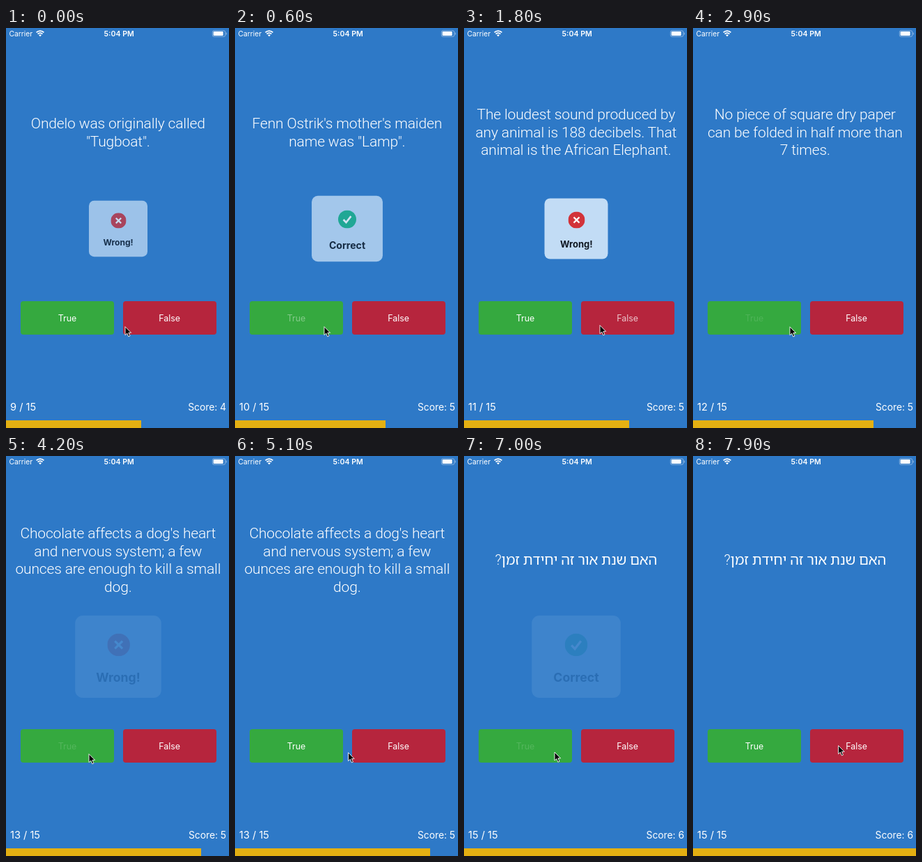
An HTML page for the animation above (8 s loop, 320 px wide and 574 px high).

```html
<!DOCTYPE html>
<html lang="en">
<head>
<meta charset="utf-8">
<title>Quiz</title>
<style>
  html, body { margin: 0; width: 100%; height: 100%; overflow: hidden; }
  body { position: relative; background: #2e79c7; color: #fff; font-family: Inter, sans-serif; }
  body > * { position: absolute; white-space: pre; }
  .mid { transform: translateY(-50%); }
  #carrier { left: 4.5px; top: 8px; font-size: 10.3px; }
  #clock { left: 140.6px; top: 8px; font-size: 10.6px; font-weight: 600; }
  #icons { left: 0; top: 0; }
  #question {
    left: .8px; width: 320px; top: 150.2px; text-align: center;
    font: 300 21px/25.5px Roboto, "Open Sans", "Noto Sans Hebrew", "Liberation Sans", sans-serif;
    letter-spacing: -.15px;
  }
  #question:dir(rtl) { font-size: 20.4px; }
  .button {
    top: 392.4px; width: 134.2px; height: 47.8px; border-radius: 4px;
    font-size: 12.4px; line-height: 49px; text-align: center;
  }
  #yes { left: 21px; background: #35a93f; }
  #no { left: 167.5px; background: #b6253d; }
  #count, #score { top: 543.8px; }
  #count { left: 6px; font-size: 14.6px; }
  #score { right: 4px; font-size: 13.8px; }
  #bar { left: 0; top: 563.2px; height: 11px; background: #e4b012; }
  #hud { left: 161.3px; top: 287.5px; height: 87px; border-radius: 8px; background: #c2dcf5; }
  #hud svg { position: absolute; left: 50%; top: 19px; margin-left: -12px; }
  #hud b {
    position: absolute; left: 0; width: 100%; top: 57px;
    font-size: 13px; line-height: 16px; text-align: center; color: #101823;
  }
  #cursor { left: 0; top: 0; overflow: visible; }
</style>
</head>
<body>
<div id="carrier" class="mid">Carrier</div>
<div id="clock" class="mid">5:04 PM</div>
<svg id="icons" width="320" height="16" fill="none" stroke="#fff">
  <path d="M43.6 6.4a7.6 7.6 0 0 1 10.8 0M45.6 8.6a4.8 4.8 0 0 1 6.8 0" stroke-width="1.7"/>
  <path d="M49 12.2l-1.9-2a2.7 2.7 0 0 1 3.8 0z" fill="#fff" stroke="none"/>
  <rect x="296.3" y="3.8" width="18.4" height="8.6" rx="2.2" stroke-width=".8" opacity=".5"/>
  <rect x="297.6" y="5.1" width="14" height="6" rx="1" fill="#fff" stroke="none"/>
  <path d="M316.2 6.6v3" opacity=".5"/>
</svg>
<div id="question" class="mid" dir="auto"></div>
<div id="yes" class="button"><span>True</span></div>
<div id="no" class="button"><span>False</span></div>
<div id="count" class="mid"></div>
<div id="score" class="mid"></div>
<div id="bar"></div>
<div id="hud">
  <svg width="24" height="24" fill="none" stroke="#fff" stroke-width="2.4">
    <circle cx="12" cy="12" r="12" stroke="none"/><path/>
  </svg>
  <b></b>
</div>
<svg id="cursor" width="10" height="15">
  <path d="M0 0V12L2.8 9.5L4.8 14.2L6.9 13.3L4.9 8.7H8.6Z" stroke="#fff" stroke-width=".9"/>
</svg>
<script>
const LOOP = 8000;
const $ = selector => document.querySelector(selector);

// Each tap answers a question and reveals the next one.
const taps = [
  { at: -865, button: 'no', score: 4, text: 'Ondelo was originally called\n"Tugboat".' },
  { at: 400, button: 'yes', score: 5, correct: true, text: 'Fenn Ostrik\'s mother\'s maiden\nname was "Lamp".' },
  { at: 1500, button: 'no', score: 5, text: 'The loudest sound produced by\nany animal is 188 decibels. That\nanimal is the African Elephant.' },
  { at: 2900, button: 'yes', score: 5, text: 'No piece of square dry paper\ncan be folded in half more than\n7 times.' },
  { at: 4100, button: 'yes', score: 5, text: 'Chocolate affects a dog\'s heart\nand nervous system; a few\nounces are enough to kill a small\ndog.' },
  { at: 5800, button: 'no', score: 5, text: 'האם ישראל קבלה\nעצמאות מבריטניה?' },
  { at: 6900, button: 'yes', score: 6, correct: true, text: 'האם שנת אור זה יחידת זמן?' },
];

// Cursor stops: time, x, y.
const stops = [
  [0, 171, 428.6], [350, 128, 428.6], [750, 128, 428.6], [1350, 195, 426.6], [1900, 195, 426.6],
  [2700, 139, 428.8], [3150, 139, 428.8], [3800, 119, 427.6], [4500, 119, 427.6], [5500, 186, 424.6],
  [5950, 186, 424.6], [6200, 160, 422.6], [6700, 130, 425], [7000, 130, 425], [7400, 175, 418],
  [7650, 175, 418], [7900, 208.6, 415.6],
];

const ease = (t, start, length) => {
  const p = Math.min(1, Math.max(0, (t - start) / length));
  return p * p * (3 - 2 * p);
};

let shown;
function showQuestion(tap) {
  if (tap === shown) return;
  shown = tap;
  const number = taps.indexOf(tap) + 9;
  $('#question').textContent = tap.text;
  $('#count').textContent = number + ' / 15';
  $('#score').textContent = 'Score: ' + tap.score;
  $('#bar').style.width = Math.min(320, number * 21.55) + 'px';
  $('#hud').style.width = (tap.correct ? 94 : 91) + 'px';
  $('#hud b').textContent = tap.correct ? 'Correct' : 'Wrong!';
  $('#hud circle').setAttribute('fill', tap.correct ? '#1db489' : '#d2333a');
  $('#hud path').setAttribute('d', tap.correct ? 'M7 12.5l3.6 3.7L17 8' : 'M8 8l8 8M16 8l-8 8');
}

function showHud(age) {
  const enter = ease(age, 60, 200), leave = ease(age, 800, 200);
  $('#hud').style.opacity = enter * (1 - leave);
  $('#hud').style.transform = `translate(-50%, -50%) scale(${1.4 - .4 * enter - .3 * leave})`;
}

function labelOpacity(t, button) {
  const tap = taps.findLast(tap => tap.button === button && t >= tap.at - 100);
  return tap ? .12 + .88 * ease(t, tap.at + 60, 380) : 1;
}

function moveCursor(t) {
  const i = stops.findLastIndex(stop => stop[0] <= t);
  const [start, x, y] = stops[i], [end, nextX, nextY] = stops[i + 1] || [LOOP, x, y];
  const p = ease(t, start, end - start);
  $('#cursor').style.transform = `translate(${x + (nextX - x) * p}px, ${y + (nextY - y) * p}px)`;
}

function draw() {
  const t = performance.now() % LOOP;
  const tap = taps.findLast(tap => tap.at <= t);
  showQuestion(tap);
  showHud(t - tap.at);
  for (const button of ['yes', 'no'])
    $(`#${button} span`).style.opacity = labelOpacity(t, button);
  moveCursor(t);
  requestAnimationFrame(draw);
}
draw();
</script>
</body>
</html>
```
